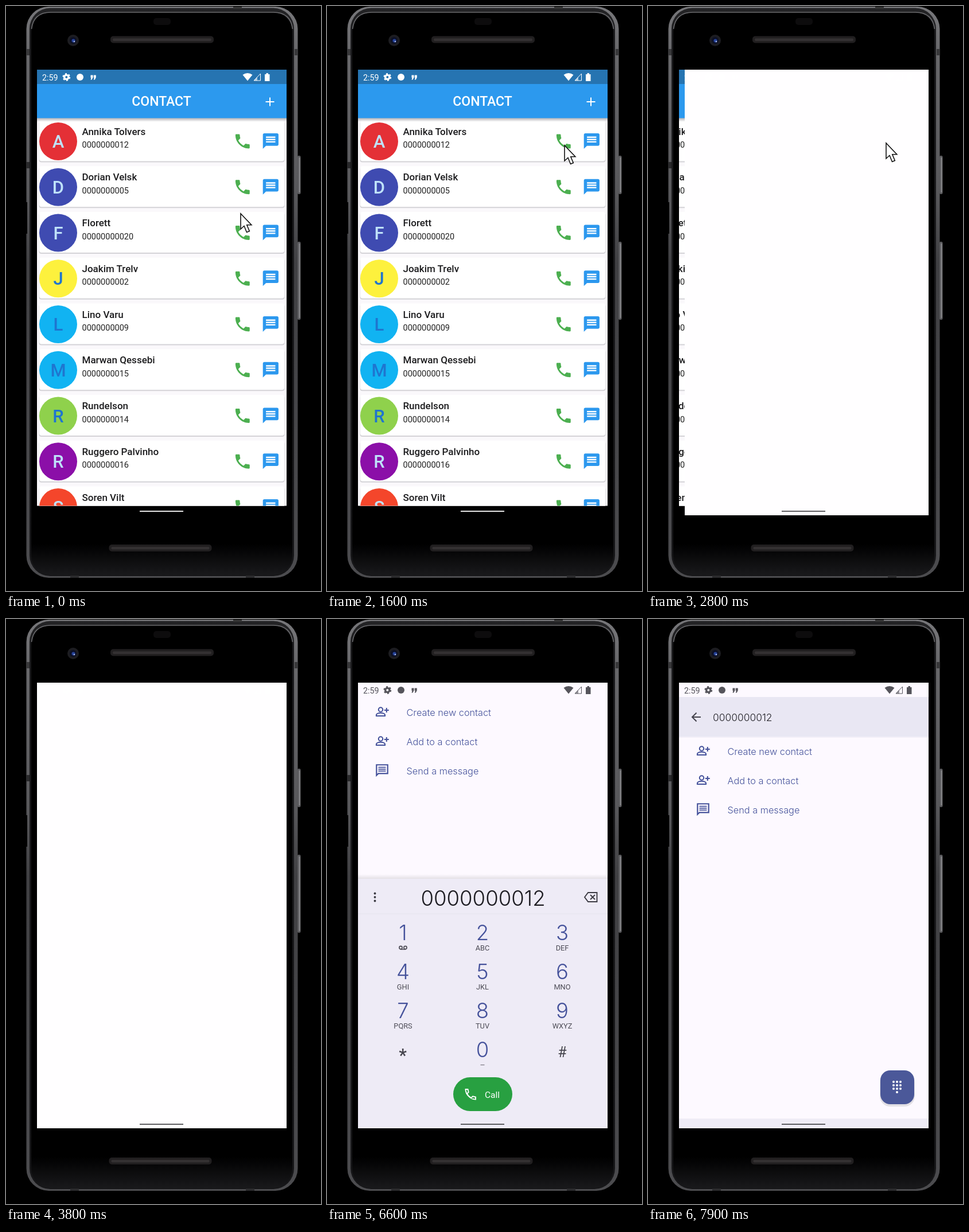
An HTML page for the animation above (8 s loop, 549 px wide and 1020 px high).

```html
<!DOCTYPE html>
<html lang="en">
<head>
<meta charset="utf-8">
<title>Contact list and dialer</title>
<style>
  html, body { margin: 0; width: 100%; height: 100%; overflow: hidden; background: #000; }
  svg { display: block; width: 100%; height: 100%; font-family: Roboto, sans-serif; }
  .mid { text-anchor: middle; }
  .bold { font-weight: 500; }
  .round { font-family: Inter, sans-serif; font-weight: 300; }
</style>
</head>
<body>
<svg id="stage" viewBox="0 0 549 1020"></svg>
<script>
const LOOP = 8000, STEP = 100;
const PITCH = 79.75;
const NUMBER = "0000000012";
const PALE = "#bfe2fa", DEEP = "#1f75cf", INDIGO = "#45529b";

const contacts = [
  ["Annika Tolvers", NUMBER, "#e43036", PALE],
  ["Dorian Velsk", "0000000005", "#3f4bb1", PALE],
  ["Florett", "00000000020", "#3f4bb1", PALE],
  ["Joakim Trelv", "0000000002", "#fdf13d", DEEP],
  ["Lino Varu", "0000000009", "#11b3f2", DEEP],
  ["Marwan Qessebi", "0000000015", "#11b3f2", DEEP],
  ["Rundelson", "0000000014", "#8fd14c", DEEP],
  ["Ruggero Palvinho", "0000000016", "#8b0fa8", PALE],
  ["Soren Vilt", "0000000025", "#f4462b", PALE],
];

const text = (x, y, size, fill, value, cls = "") =>
  `<text x="${x}" y="${y}" font-size="${size}" fill="${fill}" class="${cls}">${value}</text>`;
const rect = (x, y, w, h, fill, extra = "") =>
  `<rect x="${x}" y="${y}" width="${w}" height="${h}" fill="${fill}" ${extra}/>`;
const circle = (x, y, r, fill, extra = "") =>
  `<circle cx="${x}" cy="${y}" r="${r}" fill="${fill}" ${extra}/>`;
const path = (d, extra = "") => `<path d="${d}" ${extra}/>`;
const line = (color, width) => `fill="none" stroke="${color}" stroke-width="${width}"`;
const icon = (id, x, y, scale, color) =>
  `<use href="#${id}" transform="translate(${x} ${y}) scale(${scale}) translate(-12 -12)" color="${color}"/>`;

const defs = `<defs>
  <clipPath id="listClip">${rect(54, 111, 435, 760.5, "#000")}</clipPath>
  <clipPath id="screenClip">${rect(54, 111, 435, 777, "#000")}</clipPath>
  <linearGradient id="rim" x2="0" y2="1">
    <stop offset="0" stop-color="#77777a"/><stop offset=".08" stop-color="#68686b"/>
    <stop offset=".33" stop-color="#58585b"/><stop offset=".45" stop-color="#404043"/>
    <stop offset="1" stop-color="#4c4c4f"/>
  </linearGradient>
  <linearGradient id="bezel" x2="0" y2="1">
    <stop offset="0" stop-color="#242426"/><stop offset=".05" stop-color="#1a1a1c"/>
    <stop offset="1" stop-color="#161618"/>
  </linearGradient>
  <linearGradient id="chin" x2="0" y2="1">
    <stop offset="0" stop-color="#000"/><stop offset=".945" stop-color="#000"/>
    <stop offset="1" stop-color="#19191b"/>
  </linearGradient>
  <linearGradient id="drop" x2="0" y2="1">
    <stop offset="0" stop-color="#000" stop-opacity=".28"/><stop offset="1" stop-color="#000" stop-opacity="0"/>
  </linearGradient>
  <linearGradient id="rise" x2="0" y2="1">
    <stop offset="0" stop-color="#000" stop-opacity="0"/><stop offset="1" stop-color="#000" stop-opacity=".1"/>
  </linearGradient>
  <g id="phone"><path fill="currentColor" d="M6.6 10.8c1.4 2.8 3.8 5.1 6.6 6.6l2.2-2.2c.3-.3.7-.4 1-.2 1.1.4 2.3.6 3.6.6.6 0 1 .4 1 1V20c0 .6-.4 1-1 1C10.6 21 3 13.4 3 4c0-.6.4-1 1-1h3.5c.6 0 1 .4 1 1 0 1.3.2 2.5.6 3.6.1.4 0 .7-.3 1z"/></g>
  <g id="message"><path fill="currentColor" d="M20 2H4a2 2 0 0 0-2 2v18l4-4h14a2 2 0 0 0 2-2V4a2 2 0 0 0-2-2z"/>
    <path d="M6 7h12M6 10h12M6 13h12" stroke="#fff" stroke-width="1.8"/></g>
  <g id="chat" fill="none" stroke="currentColor" stroke-width="2">
    <path d="M3 20V3h18v14H6z"/><path d="M6 7h12M6 10h12M6 13h12" stroke-width="1.7"/></g>
  <g id="addPerson" fill="none" stroke="currentColor" stroke-width="2.1">
    <circle cx="9.5" cy="8" r="3.7"/><path d="M2 19v-2c0-2 4-3.300 7.500-3.300S17 15 17 17v2zM19.800 5v8M15.800 9h8"/></g>
  <g id="gear"><circle cx="12" cy="12" r="4" fill="none" stroke="currentColor" stroke-width="3.6"/>
    <circle cx="12" cy="12" r="6.3" fill="none" stroke="currentColor" stroke-width="2.4" stroke-dasharray="3.3"/></g>
</defs>`;

function phoneBody() {
  const speaker = (x, y, w) =>
    rect(x, y, w, 12, "#211f20", 'rx="5"') + rect(x + 4, y + 4, w - 8, 4.5, "#343132", 'rx="2"');
  const sideButton = (y, h) => rect(508, y, 5.5, h, "#5a5a5d", 'rx="2"') +
    rect(510.5, y + 3, 2, h - 6, "#88888b");
  return rect(35.5, 1, 473, 996, "url(#rim)", 'rx="39"') +
    rect(41, 3.5, 461, 990.5, "url(#bezel)", 'rx="36"') +
    rect(44, 11, 455, 981, "url(#chin)", 'rx="33"') +
    path("M44.500 40Q48 11 78 11H466Q496 11 499.500 40", line("#6b6b6e", 1.6)) +
    rect(35, 75, 6, 11, "#38383a") + rect(503, 75, 6, 11, "#38383a") +
    rect(35, 272, 6, 11, "#29292b") + rect(35, 342, 2, 55, "#000") +
    rect(396, 1, 15, 4, "#333") + rect(112, 993, 15, 4, "#2b2b2d") + rect(418, 993, 15, 4, "#2b2b2d") +
    sideButton(261, 67) + sideButton(411, 136) +
    rect(257, 21, 30, 12, "#0d0c0d", 'rx="5"') +
    speaker(182, 52.5, 180) + speaker(179.5, 939, 179) +
    circle(117, 60, 10, "#1d1d21") + circle(117, 60, 6, "#0c1026") +
    circle(117.5, 60.5, 3, "#26439a") + circle(119, 62, 1.3, "#a9b9e8");
}

function contactRow([name, number, color, ink], i) {
  return `<g transform="translate(0 ${i * PITCH})">` +
    rect(57.5, 201, 428, 71.5, "#d4d3d7", 'rx="4"') + rect(58, 199.5, 427, 71, "#fff", 'rx="4"') +
    (i ? "" : rect(397, 220, 31, 31, "#f0f0f0", 'id="press"')) +
    circle(91, 236, 33, color) + text(91, 247, 31, ink, name[0], "mid bold") +
    text(132.5, 224.5, 17, "#1c1c1e", name, "bold") + text(132.5, 247, 14.5, "#222", number) +
    icon("phone", 412.3, 236, 1.38, "#4caf50") + icon("message", 461.3, 235.5, 1.36, "#2c98ee") + "</g>";
}

function contactScreen() {
  return rect(54, 111, 435, 761, "#faf8fb") + contacts.map(contactRow).join("") +
    rect(54, 195, 435, 7, "url(#drop)") +
    rect(54, 111, 435, 25, "#2674b1") + rect(54, 136, 435, 59.5, "#2c99ee") +
    text(271, 174, 23, "#fff", "CONTACT", "mid bold") +
    path("M452.5 167h15M460 159.5v15", line("#fff", 2));
}

function keypad() {
  const labels = ["", "ABC", "DEF", "GHI", "JKL", "MNO", "PQRS", "TUV", "WXYZ"];
  const keys = labels.map((label, i) => {
    const x = [132.5, 271, 410][i % 3], y = 559.5 + 68 * Math.floor(i / 3);
    return text(x, y, 36.5, INDIGO, i + 1, "mid round") + text(x, y + 18.5, 12.8, "#4c4b55", label, "mid");
  }).join("");
  return rect(54, 445, 435, 8, "url(#rise)") + rect(54, 453, 435, 435, "#eeebf6") +
    rect(54, 513.5, 435, 1, "#e6e3ee") +
    [478.5, 485, 491.5].map(y => circle(83.5, y, 1.9, "#3c3b43")).join("") +
    text(272, 500, 36.5, "#1d1c22", NUMBER, "mid round") +
    path("M449 485l6-8h15.5v16H455zM459 481l8 8M467 481l-8 8", line("#3c3b43", 1.9)) +
    keys + circle(128.5, 573, 2.6, "none", 'stroke="#4c4b55" stroke-width="1.6"') +
    circle(136.5, 573, 2.6, "none", 'stroke="#4c4b55" stroke-width="1.6"') +
    path("M128 576h9", line("#4c4b55", 1.5)) +
    text(132, 771, 31, "#45444d", "*", "mid bold") + text(271, 763.5, 36.5, INDIGO, "0", "mid round") +
    path("M267.5 777.5h7", line("#77757f", 1.2)) + text(410, 763.5, 25, "#45444d", "#", "mid") +
    rect(220, 799, 103, 59, "#28a041", 'rx="29.5"') +
    path("M241.5 820h4l1.2 5-2.8 2.8q2.8 5 7.3 7.3l2.8-2.8 5 1.2v4C250 837.5 241.5 829 241.5 820z", line("#fff", 1.9)) +
    text(275, 835, 15.5, "#fff", "Call");
}

function dialerScreen() {
  const options = [["addPerson", "Create new contact"], ["addPerson", "Add to a contact"], ["chat", "Send a message"]];
  const dots = Array.from({ length: 9 }, (_, i) =>
    circle(428 + i % 3 * 6, 807 + Math.floor(i / 3) * 6, 2, "#fff")).join("") + circle(434, 825, 2, "#fff");
  return rect(54, 111, 435, 777, "#fdf9ff") + rect(54, 871, 435, 17, "#efecf6") +
    `<g id="header">${rect(54, 136, 435, 69.5, "#e9e7f3")}${rect(54, 205.5, 435, 1.5, "#f2eff8")}` +
    path("M92 171H77M84.5 163.5L77 171l7.5 7.5", line("#45444d", 2)) +
    text(113, 177.5, 17.4, "#222127", NUMBER, "round") + "</g>" +
    `<g id="options">${options.map(([name, label], i) =>
      icon(name, 96, 162 + 51 * i, name === "chat" ? 1.08 : 1, INDIGO) +
      text(138.5, 168.7 + 51 * i, 16.3, INDIGO, label, "round")).join("")}</g>` +
    `<g id="fab">${rect(404, 790, 61, 60, "#000", 'rx="18" opacity=".1"')}` +
    rect(405, 787, 59, 59, "#4b5899", 'rx="17"') + dots + "</g>" +
    `<g id="keypad">${keypad()}</g>`;
}

function statusIcons() {
  const comma = x => path(`M${x} 120.5h4v4l-2 4h-2l1-3.500h-1z`);
  return `<g id="status" fill="currentColor" stroke="none">` + text(63, 129.5, 14.3, "currentColor", "2:59") +
    icon("gear", 105.3, 124, 0.92, "currentColor") + circle(129, 124, 6, "currentColor") +
    comma(147.5) + comma(152.8) +
    path("M412.5 120q8.500-6 17 0l-8.500 10.500z") +
    path("M432 130L443.500 118v12z", line("currentColor", 1)) + path("M432 130l6-6.500v6.500z", 'opacity=".6"') +
    path("M451 119h2.500v-2h3.500v2h2.500v12H451z") + "</g>";
}

const stage = document.getElementById("stage");
stage.innerHTML = defs + rect(0, 0, 549, 1020, "#000") + phoneBody() +
  rect(54, 111, 435, 777, "#000") +
  `<g clip-path="url(#listClip)"><g id="contacts">${contactScreen()}</g></g>` +
  `<g clip-path="url(#screenClip)">${rect(489, 111, 435, 777, "#d7d6e3", 'id="gap"')}` +
  `${rect(489, 111, 435, 777, "#fffeff", 'id="panel"')}<g id="dialer">${dialerScreen()}</g></g>` +
  statusIcons() + rect(233, 880, 76, 1.8, "#fff", 'id="pill"') +
  `<g id="cursor">${path("M0 0V27L6 21.500l4.500 11 4.800-2-4.500-10.700h8z", 'fill="#fff" stroke="#111" stroke-width="1.6"')}</g>`;

const el = Object.fromEntries([...stage.querySelectorAll("g[id], rect[id]")].map(node => [node.id, node]));

// Tracks are [time, value] pairs, linear between neighbours.
const tracks = {
  cursorX: [[300, 409], [1300, 414], [1800, 414], [2100, 415], [3400, 415], [3500, 455], [3600, 503]],
  cursorY: [[300, 362], [1300, 243], [1800, 243], [2100, 239], [3400, 239], [3500, 242], [3600, 244]],
  listShift: [[2300, 0], [2400, 40], [2500, 86], [2700, 109]],
  panelX: [[2300, 489], [2400, 466], [2500, 424], [2600, 200], [2700, 95], [2800, 64], [2900, 54]],
  close: [[7400, 0], [7500, 0.3], [7600, 0.7], [7700, 0.93], [7800, 1]],
};

function at(track, t) {
  const next = track.findIndex(([time]) => time > t);
  if (next < 0) return track[track.length - 1][1];
  if (next === 0) return track[0][1];
  const [t0, v0] = track[next - 1], [t1, v1] = track[next];
  return v0 + (v1 - v0) * (t - t0) / (t1 - t0);
}

const move = (node, x, y) => node.setAttribute("transform", `translate(${x} ${y})`);
const show = (node, visible) => { node.style.display = visible ? "" : "none"; };

function draw(t) {
  const value = name => at(tracks[name], t);
  const shift = value("listShift"), close = value("close"), dialing = t >= 4700;
  move(el.cursor, value("cursorX"), value("cursorY"));
  show(el.cursor, t < 3700);
  show(el.press, t >= 2100);
  show(el.contacts, t < 2900);
  move(el.contacts, -shift, 0);
  el.gap.setAttribute("x", 489 - shift);
  el.panel.setAttribute("x", value("panelX"));
  show(el.dialer, dialing);
  el.status.setAttribute("color", dialing ? "#55545b" : "#fff");
  el.pill.setAttribute("fill", t >= 2600 ? "#4d4d50" : "#fff");
  move(el.keypad, 0, 445 * close);
  move(el.options, 0, 68 * close);
  el.header.setAttribute("opacity", close);
  el.fab.setAttribute("opacity", close);
}

function tick() {
  draw(Math.floor(performance.now() % LOOP / STEP) * STEP);
  requestAnimationFrame(tick);
}
tick();
</script>
</body>
</html>
```
